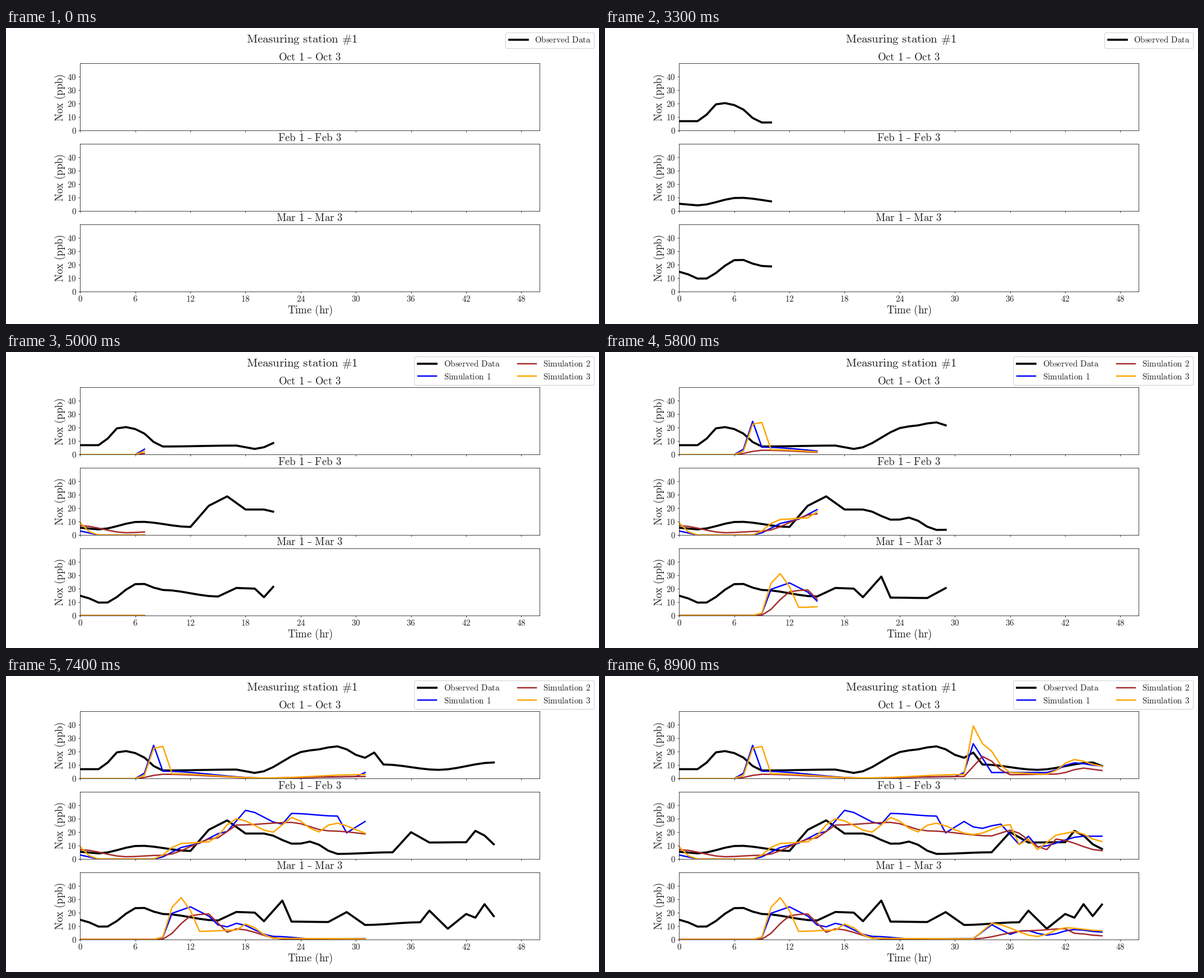
Recreate the animation shown at these times as a matplotlib script. Size 1058 px wide and 529 px high, loop 9.9 s.

```python
import matplotlib.pyplot as plt
import numpy as np
from matplotlib.animation import FuncAnimation
from matplotlib.patches import FancyBboxPatch

W, H = 1058, 529
STEP = 100          # ms per frame
FRAMES = 99
SIM_START = 42      # simulations join, everything speeds up
HOURS = np.arange(47)
BIG, MID, SMALL = 22.6, 20.4, 16.4
INK = "0.12"

plt.rcParams.update({"mathtext.fontset": "cm", "mathtext.default": "rm",
                     "text.color": INK, "xtick.labelcolor": INK,
                     "ytick.labelcolor": INK})


def series(*turns):
    """Hourly values that ease between (hour, ppb) turning points."""
    hours, values = np.array(turns).T
    place = np.interp(HOURS, hours, np.arange(len(hours)))
    k = place.astype(int)
    t = place - k
    after = np.minimum(k + 1, len(values) - 1)
    return values[k] + (values[after] - values[k]) * t * t * (3 - 2 * t)


STYLES = [("Observed Data", "black", 4), ("Simulation 1", "blue", 2.7),
          ("Simulation 2", "brown", 2.7), ("Simulation 3", "orange", 2.7)]

# Observed first, then the three simulations
PANELS = {
    "Oct 1 - Oct 3": (
        series((2, 7), (4.5, 21), (6, 19), (9, 6), (17, 6.7), (19, 4.2), (25, 21),
               (28, 24), (31, 15.5), (32, 19.4), (33, 10.5), (39, 6.5), (45, 12), (46, 9.4)),
        series((6, 0), (7, 4), (8, 24.8), (9, 5.5), (20, 0.4), (30, 1.4), (31, 4.5),
               (32, 26), (34, 4.5), (40, 4.5), (43, 11.7), (46, 9.4)),
        series((6, 0), (9, 3.2), (20, 0.4), (31, 1.5), (33, 16.5), (36, 2.9),
               (41, 3.3), (44, 7.8), (46, 6)),
        series((6, 0), (7, 2.4), (8, 22.6), (9, 24), (10, 3.6), (20, 0.4), (31, 3),
               (32, 39.3), (33, 26), (36, 4.4), (40, 3.2), (43, 14.2), (46, 9.3))),
    "Feb 1 - Feb 3": (
        series((0, 5.4), (2, 4.2), (6.5, 9.9), (12, 6), (14, 21.8), (16, 28.8), (18, 19),
               (20, 19), (23.5, 11), (25, 13), (28, 3.8), (34, 5), (36, 20), (38, 12.3),
               (42, 12.5), (43, 21), (46, 7.5)),
        series((0, 3), (2, 0), (8, 0), (12, 10.2), (16, 20.5), (18, 36.3), (22, 26),
               (23, 34), (28, 32), (29, 19.5), (31, 28), (32.5, 22.5), (35, 26),
               (37, 10.8), (38, 17), (39, 9), (44, 17)),
        series((0, 7), (5, 1.7), (9, 2.8), (15, 15.8), (17, 25.3), (23, 27.3), (27, 21),
               (34, 17.2), (36, 21.5), (40, 7), (41, 14.8), (46, 6.2)),
        series((0, 9.2), (1.5, 0), (8, 0), (11, 11.6), (14, 12.8), (17, 30), (21, 20),
               (23, 31), (26, 20.2), (27.5, 27), (32, 18.2), (36, 25.7), (37, 10.8),
               (38, 15), (39, 7), (41, 17.8), (43, 20.5), (46, 13))),
    "Mar 1 - Mar 3": (
        series((0, 14.7), (2.5, 9), (6.5, 24), (9, 19), (15, 14.1), (17, 20.5), (19, 20),
               (20, 13.6), (22, 29), (23, 13.3), (27, 13), (29, 20.4), (31, 10.8),
               (37, 12.8), (38, 21.5), (40, 8), (42, 19), (43, 16.2), (44, 26.3),
               (45, 17.4), (46, 26)),
        series((8.8, 0), (10, 19.5), (12, 24.3), (14, 17.4), (15.5, 8.5), (17, 12),
               (21, 2.3), (26, 0.2), (32, 0.6), (34, 11), (36, 3.8), (37.5, 7),
               (40, 3.2), (43, 7.4), (46, 5.5)),
        series((8.8, 0), (12.5, 18.5), (14, 19), (16, 5.4), (17, 7.9), (22, 0.4),
               (32, 0.4), (38, 6.5), (42, 8), (43, 4.6), (46, 2.7)),
        series((8.8, 0), (10, 24), (11, 31.2), (12, 21.5), (13, 6), (17, 7), (18, 11.5),
               (21, 0.8), (32, 0.4), (34, 12), (39, 2.2), (42, 8.7), (46, 6.5))),
}


def tex(s):
    """Upright Computer Modern with a real hyphen and word spaces."""
    s = s.replace("-", r"\dfrac{\hspace{0.28}}{\hspace{0.28}}")
    s = s.replace(" ", r"\hspace{0.38}")
    return "$" + s.replace("#", r"\text{#}") + "$"


fig, axes = plt.subplots(3, 1, sharex=True, figsize=(16, 8), dpi=W / 16)
fig.subplots_adjust(left=0.125, right=0.9, bottom=0.11, top=0.88, hspace=0.2)

# Pixel-space layer for headings and legends
page = fig.add_axes([0, 0, 1, 1], zorder=5)
page.set(xlim=(0, W), ylim=(H, 0))
page.axis("off")


def label(x, y, s, size, ha="center", **kw):
    return page.text(x, y, tex(s), fontsize=size, ha=ha, va="baseline", **kw)


curves = []
for k, (ax, (title, runs)) in enumerate(zip(axes, PANELS.items())):
    for n, ((_, color, lw), data) in enumerate(zip(STYLES, runs)):
        line, = ax.plot([], [], color=color, lw=lw)
        curves.append((line, data, n == 0))
    ax.set_title(tex(title), fontsize=MID)
    hours, levels = range(0, 50, 6), range(0, 50, 10)
    ax.set_xticks(hours, [tex(str(h)) for h in hours], fontsize=SMALL)
    ax.set_yticks(levels, [tex(str(v)) for v in levels], fontsize=SMALL)
    ax.tick_params(axis="x", labelbottom=k == 2)
    ax.set(xlim=(0, 50), ylim=(0, 50))
    label(102, 124 + 143.75 * k, "Nox (ppb)", MID,
          rotation=90, rotation_mode="anchor")

label(528.5, 26.2, "Measuring station #1", BIG)
label(542.5, 510.3, "Time (hr)", MID)


def legend(left, bottom, entries):
    """Framed key; entries are (x, baseline, style)."""
    box = FancyBboxPatch((left, 8.4), 1049.7 - left, bottom - 8.4,
                         boxstyle="round,pad=0,rounding_size=3.3",
                         fc="white", ec="0.8", lw=1)
    parts = [page.add_patch(box)]
    for x, y, (name, color, lw) in entries:
        parts += page.plot([x, x + 33], [y - 5.8] * 2, color=color, lw=lw)
        parts.append(label(x + 45.4, y, name, SMALL, ha="left"))
    return parts


spots = [(x, y) for x in (735.2, 912.8) for y in (26.3, 49.2)]
short_key = legend(891.4, 36.6, [(897.6, 26.3, STYLES[0])])
full_key = legend(728.8, 59.5, [(x, y, s) for (x, y), s in zip(spots, STYLES)])


def draw(i):
    fast = i >= SIM_START
    n_obs = i - SIM_START + 14 if fast else i // 3
    n_sim = max(i - SIM_START, 0)
    for line, data, observed in curves:
        shown = data[:n_obs if observed else n_sim]
        line.set_data(HOURS[:len(shown)], shown)
    for part in short_key:
        part.set_visible(not fast)
    for part in full_key:
        part.set_visible(fast)
    return []


anim = FuncAnimation(fig, draw, frames=FRAMES, init_func=lambda: draw(0),
                     interval=STEP, repeat=True, repeat_delay=0, blit=False)
plt.show()
```
